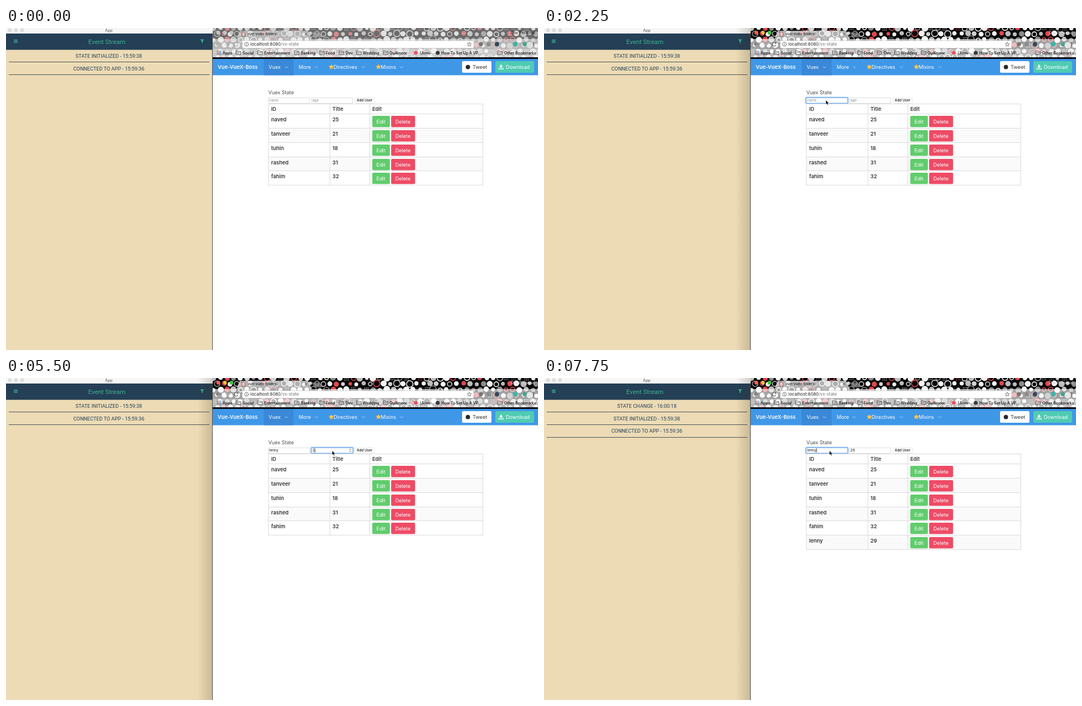
These frames come from a looping animation (960 by 583 pixels, 8 s). An HTML page with a canvas:

```html
<!DOCTYPE html>
<html lang="en">
<head>
<meta charset="utf-8">
<title>Event stream</title>
<style>
  html, body { margin: 0; width: 100%; height: 100%; overflow: hidden; background: #fff; }
  canvas, svg { position: absolute; left: 0; top: 0; width: 960px; height: 583px; display: block; }
  text { white-space: pre; }
</style>
</head>
<body>
<canvas id="stage" width="960" height="583"></canvas>
<svg id="labels" viewBox="0 0 960 583"></svg>
<script>
const LOOP = 8000, TICK = 250, TAU = Math.PI * 2;
const ctx = document.getElementById('stage').getContext('2d');
const labels = document.getElementById('labels');
const SANS = 'Inter, "Open Sans", sans-serif';
const ROBOTO = 'Roboto, Arial, sans-serif';
const NEW_USER = 'lenny';
const USERS = [['naved', 25], ['tanveer', 21], ['tuhin', 18], ['rashed', 31], ['fahim', 32], [NEW_USER, 29]];

// [time, x, y] of the pointer tip; it holds until the next entry
const POINTER = [
  [250, 585, 64], [500, 560, 88], [750, 534, 112], [1000, 516, 131],
  [1500, 511, 130.5], [1750, 508.5, 130.5],
  [4000, 530, 119], [4250, 562, 112], [4500, 588.5, 131.5],
  [6000, 608, 136], [6250, 636, 134], [6500, 648, 129.5],
  [7250, 618, 128], [7500, 552, 132], [7750, 515, 131.5]
];
const NAME_KEYS = [[0, ''], [2750, 1], [3000, 2], [3250, 3], [3500, 5]];
const AGE_KEYS = [[0, ''], [5500, 1], [5750, 2]];
const FOCUS = [[0, ''], [1750, 'name'], [4500, 'age'], [6500, 'button'], [7750, 'name']];
const CARET = [[0, 0], [1750, 1], [2250, 0], [2500, 1], [4000, 0], [4500, 1], [5000, 0], [5500, 1]];

function at(keys, ms) {
  let found = null;
  for (const k of keys) if (k[0] <= ms) found = k;
  return found;
}

function random(seed) {
  return () => (seed = (seed * 16807) % 2147483647) / 2147483647;
}

function rect(x, y, w, h, fill) {
  ctx.fillStyle = fill;
  ctx.fillRect(x, y, w, h);
}

function round(x, y, w, h, r, fill, stroke, width = 1) {
  ctx.beginPath();
  ctx.roundRect(x, y, w, h, r);
  if (fill) { ctx.fillStyle = fill; ctx.fill(); }
  if (stroke) { ctx.strokeStyle = stroke; ctx.lineWidth = width; ctx.stroke(); }
}

function disc(x, y, r, fill) {
  ctx.beginPath();
  ctx.arc(x, y, r, 0, TAU);
  ctx.fillStyle = fill;
  ctx.fill();
}

function ring(x, y, r, color, width) {
  ctx.beginPath();
  ctx.arc(x, y, r, 0, TAU);
  ctx.strokeStyle = color;
  ctx.lineWidth = width;
  ctx.stroke();
}

function path(points, color, width) {
  ctx.beginPath();
  points.forEach(([x, y]) => ctx.lineTo(x, y));
  if (width) {
    ctx.strokeStyle = color;
    ctx.lineWidth = width;
    ctx.stroke();
  } else {
    ctx.fillStyle = color;
    ctx.fill();
  }
}

function star(x, y, r, fill, stroke) {
  ctx.beginPath();
  for (let i = 0; i < 10; i++) {
    const a = i * TAU / 10 - TAU / 4, d = i % 2 ? r * 0.48 : r;
    ctx.lineTo(x + d * Math.cos(a), y + d * Math.sin(a));
  }
  ctx.closePath();
  if (fill) { ctx.fillStyle = fill; ctx.fill(); }
  ctx.strokeStyle = stroke;
  ctx.lineWidth = 0.7;
  ctx.stroke();
}

function shape(tag, attrs) {
  const el = document.createElementNS('http://www.w3.org/2000/svg', tag);
  for (const key in attrs) el.setAttribute(key, attrs[key]);
  return labels.appendChild(el);
}

function text(x, y, value, size, fill, more = {}) {
  shape('text', { x, y, fill, 'font-size': size, 'font-family': SANS, ...more }).textContent = value;
}

const BOLD = { 'font-weight': 600 };
const MEDIUM = { 'font-weight': 500 };

function eventPane(changed, active) {
  rect(0, 0, 373, 583, '#ecdbb5');
  rect(0, 0, 373, 10, '#f6f6f6');
  for (const x of [7, 18, 29]) disc(x, 4, 3.4, '#dcdcdc');
  text(185.5, 7, 'App', 7, '#555', { 'text-anchor': 'middle' });
  rect(0, 10, 373, 29.5, '#243f56');
  const green = '#3db28f';
  for (let i = 0; i < 3; i++) rect(14, 21 + i * 2.3, 7, 1.2, green);
  path([[350.5, 20.5], [357.5, 20.5], [355, 23.7], [355, 27.5], [353, 26], [353, 23.7]], green);
  text(182, 28.8, 'Event Stream', 11.4, green, { 'text-anchor': 'middle', 'font-family': ROBOTO });

  const events = ['STATE INITIALIZED - 15:59:38', 'CONNECTED TO APP - 15:59:36'];
  if (changed) events.unshift('STATE CHANGE - 16:00:18');
  events.forEach((line, i) => {
    text(185.5, 54 + i * 22.7, line, 9.1, '#243f56', { 'text-anchor': 'middle', 'font-family': ROBOTO });
    rect(5, 61 + Math.round(i * 22.9), 362, 1, '#4d5257');
  });

  if (active) {
    const shade = ctx.createLinearGradient(346, 0, 373, 0);
    shade.addColorStop(0, 'rgba(60,45,20,0)');
    shade.addColorStop(1, 'rgba(60,45,20,.2)');
    rect(346, 0, 27, 583, shade);
  }
}

function dots() {
  const rnd = random(4711);
  const tones = ['#f4f4f4', '#f4f4f4', '#d2d2d2', '#bdbdbd', '#8c8c8c', '#e3484f'];
  rect(373, 0, 587, 54, '#080808');
  for (let row = 0; row < 6; row++) {
    for (let col = 0; col < 51; col++) {
      const x = 374 + col * 12 + (row % 2) * 6 + rnd() * 2;
      const y = row * 10.5 + rnd() * 2 - 1;
      const tone = tones[Math.floor(rnd() * tones.length)];
      const r = 3 + rnd() * 3;
      if (rnd() < 0.22) ring(x, y, r, tone, 1.6);
      else if (rnd() < 0.16) {
        for (let k = 0; k < 9; k++) disc(x + (k % 3 - 1) * 3, y + (Math.floor(k / 3) - 1) * 3, 0.8, tone);
      } else disc(x, y, r, tone);
    }
  }
}

function folder(x) {
  path([[x, 41.5], [x + 3.2, 41.5], [x + 4.2, 42.6], [x + 8.6, 42.6], [x + 8.6, 48], [x, 48], [x, 41.2]], '#555', 0.9);
  rect(x, 44, 8.6, 0.7, '#777');
}

function browserTop(active) {
  ctx.save();
  ctx.beginPath();
  ctx.rect(373, 0, 587, 54);
  ctx.clip();
  dots();
  if (!active) rect(373, 0, 587, 54, 'rgba(205,205,205,.5)');
  rect(373, 20, 587, 34, active ? 'rgba(255,255,255,.62)' : 'rgba(245,245,245,.55)');
  rect(373, 38, 587, 16, 'rgba(255,255,255,.25)');
  ctx.restore();

  path([[416, 20], [422, 5], [545, 5], [552, 20]], active ? 'rgba(255,255,255,.68)' : 'rgba(240,240,240,.55)');
  path([[552, 8], [566, 8], [570, 17], [556, 17]], 'rgba(190,190,190,.5)');
  const lights = active ? ['#f25f57', '#f6bd3b', '#3ec544'] : ['#c6c6c6', '#c6c6c6', '#c6c6c6'];
  lights.forEach((c, i) => disc(383 + i * 12, 8.5, 3.4, c));
  path([[425.5, 7], [429.5, 7], [431.5, 9], [431.5, 15], [425.5, 15], [425.5, 6.6]], '#555', 0.9);
  path([[539, 9], [543, 13]], '#555', 0.9);
  path([[543, 9], [539, 13]], '#555', 0.9);
  text(435.5, 13.3, 'vue-vuex-lovers', 6.8, '#111');
  text(911, 11.3, 'Dov Personal', 7, active ? '#d5d5d5' : '#161616');

  const tool = active ? '#555' : '#a0a0a0';
  path([[383, 26], [379.7, 29.5], [383, 33]], tool, 1.1);
  path([[379.7, 29.5], [387, 29.5]], tool, 1.1);
  path([[400, 26], [403.3, 29.5], [400, 33]], '#aaa', 1.1);
  path([[396, 29.5], [403.3, 29.5]], '#aaa', 1.1);
  ctx.beginPath();
  ctx.arc(415.5, 29.5, 3.3, 0.5, 5.6);
  ctx.strokeStyle = tool;
  ctx.lineWidth = 1.1;
  ctx.stroke();
  path([[416, 28.5], [419.3, 28.5], [419.3, 25.3]], tool);

  round(426.5, 23, 417.5, 13.5, 2, '#fff', '#c9c9c9', 0.7);
  ring(434, 29.5, 3.5, '#555', 0.8);
  rect(433.6, 28.8, 0.9, 2.7, '#555');
  rect(433.6, 27.3, 0.9, 0.9, '#555');
  star(836, 29.7, 4, null, '#444');
  text(441, 32.3, 'localhost:8080', 7.75, '#222');
  ctx.font = '7.75px ' + SANS;
  text(441 + ctx.measureText('localhost:8080').width, 32.3, '/vx-state', 7.75, '#777');

  disc(857, 29.3, 3.7, '#77766d');
  disc(871, 29.3, 3.9, '#8d8d8d');
  disc(886, 29.3, 4, '#34465f');
  disc(919, 29.3, 4.6, '#40b5a6');
  disc(936, 29.3, 3.7, '#43a58e');
  for (let i = 0; i < 3; i++) disc(952, 26.5 + i * 2.7, 0.9, '#555');

  for (let i = 0; i < 9; i++) {
    rect(380.7 + (i % 3) * 2.8, 41.2 + Math.floor(i / 3) * 2.7, 1.9, 1.9, ['#d9534a', '#52a064', '#4c7fca'][(i * 2 + 1) % 3]);
  }
  const marks = [
    ['Apps', 391], ['Social', 427, 415], ['Entertainment', 466, 454], ['Banking', 532, 520.5],
    ['Food', 577, 566], ['Dev', 613, 601], ['Wedding', 644, 632.5], ['Quillmoor', 692, 681],
    ['Ulomi', 747], ['How To Set Up A VP...', 785.5], ['Other Bookmarks', 899, 887]
  ];
  for (const [label, x, icon] of marks) {
    if (icon) folder(icon);
    text(x, 47.5, label, 6.9, '#111', MEDIUM);
  }
  disc(739.5, 45, 3.3, '#e8525b');
  disc(779, 45, 3.6, '#37393d');
  rect(373, 53, 587, 3, '#080a0d');
}

function chevron(x) {
  path([[x - 3, 69.4], [x, 72.4], [x + 3, 69.4]], '#b8d9f8', 0.9);
}

function navbar() {
  rect(373, 56, 587, 29.5, '#3f97e8');
  rect(465, 56, 54, 29.5, '#3a88d7');
  text(382, 74, 'Vue-VueX-Boss', 9.3, '#fff', BOLD);
  const items = [['Vuex', 474, 506], ['More', 528, 560], ['Directives', 591, 645], ['Mixins', 676, 714]];
  items.forEach(([label, x, arrow], i) => {
    if (i > 1) star(x - 4, 70.5, 4.8, '#f8cf58', '#e3a23d');
    text(x, 74, label, 9.15, '#fff');
    chevron(arrow);
  });
  round(823, 60, 53, 21, 2, '#fff');
  disc(833.5, 70.7, 3.9, '#25282c');
  text(842, 74, 'Tweet', 9.1, '#333');
  round(883, 60, 70, 21, 2, '#50cbb3');
  path([[892, 66.5], [894.6, 66.5], [894.6, 69.3], [896.8, 69.3], [893.3, 73], [889.8, 69.3], [892, 69.3]], '#fff');
  path([[889.4, 72.3], [889.4, 74.4], [897.3, 74.4], [897.3, 72.3]], '#fff', 1.2);
  text(902, 74, 'Download', 9.1, '#fff');
}

function field(x, value, hint, focused, caret) {
  if (focused) {
    round(x - 0.5, 125.7, 76, 11, 1.5, '#fff', '#a9cdf5', 2.4);
    round(x, 126.2, 75, 10, 1, '#fff', '#5a9ce6', 1);
  } else {
    round(x + 0.5, 126.5, 74, 10, 0, '#fff', '#dedede', 1);
  }
  text(x + 2, 133.3, value || hint, 6.4, value ? '#111' : '#8c8c8c');
  if (focused && caret) {
    ctx.font = '6.4px ' + SANS;
    rect(x + 2.2 + ctx.measureText(value).width, 127.5, 0.8, 7.5, '#111');
  }
}

function page(state) {
  rect(373, 85, 587, 498, '#fff');
  navbar();
  text(473.5, 120, 'Vuex State', 9, '#4a4a4a');
  field(473, state.name, 'name', state.focus === 'name', state.caret);
  field(551, state.age, 'age', state.focus === 'age', state.caret);
  if (state.focus === 'age') {
    path([[619.5, 130], [621, 128], [622.5, 130]], '#777');
    path([[619.5, 132.2], [621, 134.2], [622.5, 132.2]], '#777');
  }
  round(629.5, 126.5, 35.5, 9.5, 1.5, state.pressed ? '#dcebfb' : '#fff', '#e2e2e2', 0.8);
  text(633, 133.3, 'Add User', 6.3, '#111', MEDIUM);

  const rows = USERS.slice(0, state.changed ? 6 : 5);
  const line = '#dbdbdb', step = 25.85;
  const bottom = Math.round(155 + rows.length * step);
  text(478.5, 150, 'ID', 9.2, '#363636', BOLD);
  text(589, 150, 'Title', 9.2, '#363636', BOLD);
  text(661, 150, 'Edit', 9.2, '#363636', BOLD);
  rows.forEach(([name, age], i) => {
    const y = Math.round(155 + i * step);
    if (i % 2) rect(474, y, 386, 26, '#fafafa');
    rect(473, y, 388, 1, line);
    text(478.5, y + 14.2, name, 9.4, '#363636', BOLD);
    text(589, y + 14.2, age, 9.4, '#363636', BOLD);
    round(661, y + 4, 31.7, 20.5, 2, '#61cc6d');
    text(668.5, y + 17.6, 'Edit', 9.1, '#fff');
    round(695, y + 4, 43.2, 20.5, 2, '#ee4b65');
    text(702.5, y + 17.6, 'Delete', 9.1, '#fff');
  });
  rect(473, 137, 388, 1, line);
  rect(473, bottom, 388, 1, line);
  for (const x of [473, 584, 656, 860]) rect(x, 137, 1, bottom - 136, line);
}

function render(ms) {
  const state = {
    active: ms >= 1250,
    changed: ms >= 6750,
    pressed: ms >= 6500 && ms < 6750,
    focus: at(FOCUS, ms)[1],
    caret: at(CARET, ms)[1],
    name: NEW_USER.slice(0, at(NAME_KEYS, ms)[1] || 0),
    age: '29'.slice(0, at(AGE_KEYS, ms)[1] || 0)
  };
  labels.replaceChildren();
  ctx.clearRect(0, 0, 960, 583);
  eventPane(state.changed, state.active);
  browserTop(state.active);
  page(state);
  rect(372, 10, 1, 573, '#4b4f52');
  const tip = at(POINTER, ms);
  if (tip) {
    shape('path', {
      d: 'M0 0V8.1L1.9 6.4L3.2 9.3L4.6 8.7L3.4 5.9H5.9Z',
      transform: `translate(${tip[1]} ${tip[2]})`,
      fill: '#000', stroke: '#fff', 'stroke-width': 0.6
    });
  }
}

let shown = -1;
function frame() {
  const tick = Math.floor((performance.now() % LOOP) / TICK);
  if (tick !== shown) {
    shown = tick;
    render(tick * TICK);
  }
  requestAnimationFrame(frame);
}
frame();
</script>
</body>
</html>
```
